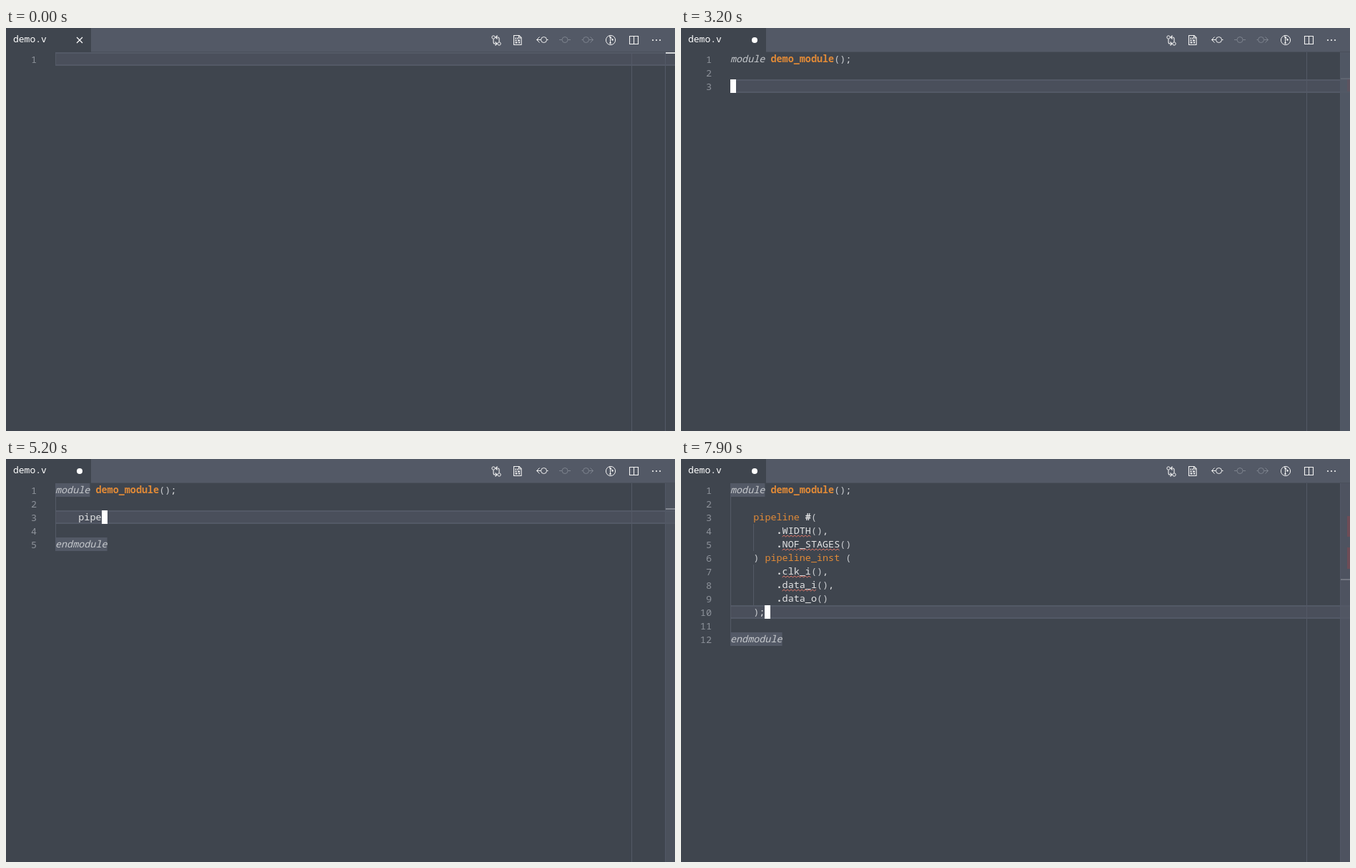
An HTML page with a canvas that plays this animation: 936 by 565 pixels, repeating every 8000 ms.

```html
<!DOCTYPE html>
<html lang="en">
<head>
<meta charset="utf-8">
<title>Verilog completion</title>
<style>
html, body { margin: 0; width: 100%; height: 100%; overflow: hidden; background: #3f454e; }
canvas { display: block; }
</style>
</head>
<body>
<canvas id="stage" width="936" height="565"></canvas>
<script>
const ctx = document.getElementById('stage').getContext('2d');
const LOOP = 8000, TOP = 34, LEFT = 69, ROW = 19, CELL = 8.065, CODE = 13.44;
const color = {
  bg: '#3f454e', bar: '#535966', line: '#4a4f5b', white: '#f2f2f2', text: '#e4e5e6',
  soft: '#c6c9cd', number: '#8d929a', orange: '#e18a37', blue: '#0b86e4',
  warning: '#c9a416', error: '#e2786a', dim: '#7d838e'
};
const HEADER = 'module demo_module';
const SNIPPET = [
  HEADER + '();', '', '    pipeline #(', '        .WIDTH(),', '        .NOF_STAGES()',
  '    ) pipeline_inst (', '        .clk_i(),', '        .data_i(),', '        .data_o()',
  '    );', '', 'endmodule'
];

const clamp = (v, lo = 0, hi = 1) => Math.min(hi, Math.max(lo, v));
const rowY = row => TOP + row * ROW;
const colX = col => LEFT + col * CELL;

function rect(x, y, w, h, fill) {
  ctx.fillStyle = fill;
  ctx.fillRect(x, y, w, h);
}

function text(str, x, y, fill = color.text, size = CODE, style = '') {
  ctx.font = `${style} ${size}px "Noto Sans Mono", "DejaVu Sans Mono", monospace`;
  ctx.fillStyle = fill;
  ctx.fillText(str, x, y);
}

function stroke(path, ink = color.white, width = 1) {
  ctx.strokeStyle = ink;
  ctx.lineWidth = width;
  ctx.stroke(new Path2D(path));
}

function circle(x, y, r, ink, filled) {
  ctx.beginPath();
  ctx.arc(x, y, r, 0, Math.PI * 2);
  ctx.lineWidth = 1;
  ctx.fillStyle = ctx.strokeStyle = ink;
  filled ? ctx.fill() : ctx.stroke();
}

// How much of a phrase is typed when keys land evenly on 100 ms steps.
function typed(str, start, end, t) {
  const steps = (end - start) / 100 + 1;
  const done = clamp(Math.floor((t - start) / 100) + 1, 0, steps);
  return str.slice(0, Math.round(done * str.length / steps));
}

// The document, cursor and diagnostics at time t.
function editorAt(t) {
  const head = HEADER + '();';
  const state = (lines, row, col, extra) => ({ lines, row, col, squiggles: [], marks: [], ...extra });
  if (t < 2500) {
    const name = typed(HEADER.slice(0, 10), 800, 1500, t) + typed(HEADER.slice(10), 1700, 2200, t);
    const line = name + (t >= 2400 ? '();' : t >= 2300 ? '()' : '');
    return state([line], 0, t >= 2300 && t < 2400 ? 19 : line.length);
  }
  if (t < 2600) return state([head, ''], 1, 0);
  if (t < 4200) {
    const word = typed('endmodule', 3300, 4000, t);
    return state([head, '', word], 2, word.length, { marks: [[2, 'red']] });
  }
  if (t < 4300) return state([head, '', '', 'endmodule'], 3, 0);
  if (t < 7100) {
    const line = t < 4600 ? '' : '    ' + typed('pipe', 4800, 5100, t);
    const broken = t >= 5300;
    return state([head, '', line, '', 'endmodule'], t < 4400 ? 4 : 2, line.length, {
      squiggles: broken ? [[2, 4, 4, color.warning], [4, 0, 9, color.error]] : [],
      marks: broken ? [[2, 'orange'], [4, 'red']] : []
    });
  }
  if (t < 7400) return state(SNIPPET, 9, 6, {
    squiggles: [[2, 4, 4, color.warning], [11, 0, 9, color.error]],
    marks: [[2, 'orange'], [11, 'red']]
  });
  return state(SNIPPET, 9, 6, {
    squiggles: [[3, 9, 5], [4, 9, 10], [6, 9, 5], [7, 9, 6]].map(s => [...s, color.error]),
    marks: [3, 4, 6, 7].map(row => [row, 'red'])
  });
}

function sliderAlpha(t) {
  const shows = [[2600, 3120], [4300, 4900], [7200, 7700]];
  const current = shows.filter(([on]) => t >= on).pop();
  return current ? clamp(1 - (t - current[1]) / 800) : 0;
}

function drawToolbar(dirty) {
  rect(0, 0, 936, 33, color.bar);
  rect(119, 33, 817, 1, '#4a505b');
  rect(0, 0, 119, 34, color.bg);
  text('demo.v', 10, 20, '#ffffff', 13);
  if (dirty) circle(103, 17, 4, '#ffffff', true);
  else stroke('M99 13l8 8m0-8l-8 8', '#ffffff', 1.2);

  circle(682, 13, 2.2, color.white);
  circle(690, 22, 2.2, color.white);
  stroke('M682 15.5V20q0 2 2 2h3m-2.5-2.5L687 22l-2.5 2.5M690 19.5V15q0-2-2-2h-3m2.5-2.5L685 13l2.5 2.5', color.white, 1.1);

  stroke('M710.5 10.5h7.5l3 3v10h-10.5zM717.5 10.5v3.5h3.5', color.white, 1.1);
  stroke('M712.5 14.5h1.5m1 0h1.5M712.5 17.5h2m1.5 0h3M712.5 20.5h3m1.5 0h2', color.white, 2);

  circle(752.5, 16.5, 4, color.white);
  stroke('M748.5 16.5H742.5m4-4l-4 4l4 4M756.5 16.5h2');
  circle(782, 16.5, 4, color.dim);
  stroke('M774 16.5h4m8 0h4', color.dim);
  circle(811.5, 16.5, 4, color.dim);
  stroke('M805.5 16.5h2m8 0h6m-4-4l4 4l-4 4', color.dim);

  circle(846, 17, 6.6, color.white);
  stroke('M845.5 12v10M844 11l5 5.5');
  circle(845.5, 21, 1.2, color.white, true);
  circle(845.5, 13, 1.2, color.white, true);
  circle(848.5, 16.5, 1.2, color.white, true);
  stroke('M872.5 11.5h12v11h-12zM878.5 11.5v11', color.white, 1.1);
  for (const x of [905, 910, 915]) circle(x, 17, 1.1, color.white, true);
}

function tokenStyle(word, row, col) {
  if (/^(end)?module$/.test(word) && col === 0) return [color.soft, 'italic'];
  if (row === 0 && col >= 7 && /\w/.test(word)) return [color.orange, 'bold'];
  if (word.startsWith('pipeline')) return [color.orange, ''];
  if (/[()]/.test(word)) return [color.soft, ''];
  return [color.text, /[.#]/.test(word) ? 'bold' : ''];
}

function drawSquiggle(row, col, count, ink) {
  const x0 = colX(col), y = rowY(row) + 17;
  ctx.beginPath();
  for (let x = 0, i = 0; x <= count * CELL; x += 2.5, i++) ctx.lineTo(x0 + x, y + (i % 2 ? -1 : 1));
  ctx.strokeStyle = ink;
  ctx.lineWidth = 1;
  ctx.stroke();
}

function drawGuides(lines) {
  if (!lines.some(line => line.startsWith('    '))) return;
  rect(LEFT, rowY(1), 1, (lines.length - 2) * ROW, '#545a66');
  lines.forEach((line, row) => {
    if (line.startsWith('        ')) rect(101, rowY(row), 1, ROW, '#545a66');
  });
}

function drawOverview(editor, t) {
  const pitch = 19.3 - 0.37 * editor.lines.length;
  const markY = row => TOP + row * pitch + (row ? 1 : 0);
  rect(922, TOP, 1, 531, color.bar);
  for (const [row, kind] of editor.marks) {
    rect(932, Math.round(markY(row)), 4, Math.round(pitch), kind === 'red' ? '#be2826' : '#cc882b');
  }
  rect(923, Math.round(markY(editor.row)) - (editor.row ? 1 : 0), 13, 2, '#d2d5d8');
  ctx.globalAlpha = sliderAlpha(t);
  rect(922, TOP, 14, 531, color.bar);
  ctx.globalAlpha = 1;
}

function drawEditor(editor, t) {
  const { lines, row, col } = editor;
  const y = rowY(row);
  rect(LEFT, y, 867, ROW, color.bar);
  rect(LEFT + 1, y + 2, 866, ROW - 4, color.line);
  if (t >= 4200) {
    rect(LEFT, TOP, 6 * CELL, ROW, color.bar);
    rect(LEFT, rowY(lines.length - 1), 9 * CELL, ROW, color.bar);
  }
  drawGuides(lines);
  rect(875, TOP, 1, 531, color.bar);

  lines.forEach((line, i) => {
    const base = rowY(i) + 14, label = String(i + 1);
    text(label, 43 - label.length * CELL, base + 1, color.number);
    for (const { 0: word, index } of line.matchAll(/\w+|[()]+|[^\w\s()]/g)) {
      const [ink, style] = tokenStyle(word, i, index);
      text(word, colX(index), base, ink, CODE, style);
    }
  });
  editor.squiggles.forEach(s => drawSquiggle(...s));
  if (t >= 800) rect(Math.round(colX(col)), y, 8, ROW, '#ffffff');
  drawOverview(editor, t);
}

function drawSuggestion() {
  rect(134, 91, 330, 19, color.bar);
  text('{}', 137, 106, color.soft, 12.5);
  text('pipe', 157, 106, color.blue, CODE, 'bold');
  text('line', 157 + 4 * CELL, 106, color.soft);
}

function badge(label, y, width) {
  ctx.beginPath();
  ctx.roundRect(477, y - 12, width, 15, 3);
  ctx.fillStyle = '#30323b';
  ctx.fill();
  text(label, 484, y - 1, color.text, 11.9);
}

function drawDocs() {
  const doc = (str, x, y, style) => text(str, x, y, color.text, 14, style);
  rect(464, 91, 330, 170, color.bar);
  rect(465, 92, 328, 168, '#41444e');
  text('module pipeline', 470, 110, '#b4b7bc');
  stroke('M778 97.5l7 7m0-7l-7 7', color.soft, 1.1);
  doc('A parametrized pipeline module.', 470, 145);
  doc("You're able to configure the ", 470, 164);
  doc('width', 713.6, 164, 'italic');
  doc('(', 470, 183);
  badge('WIDTH', 183, 48);
  doc(') and the', 525, 183);
  doc('number of stages', 609, 183, 'italic');
  doc('(', 470, 202);
  badge('NOF_STAGES', 202, 83);
  doc(')', 560, 202);
  rect(470, 221, 296, 2, color.white);
  doc('File: pipeline.v', 470, 251);
}

function draw(t) {
  rect(0, 0, 936, 565, color.bg);
  drawToolbar(t >= 800);
  drawEditor(editorAt(t), t);
  if (t >= 5500 && t < 7100) drawSuggestion();
  if (t >= 5600 && t < 7100) drawDocs();
}

function tick() {
  draw(Math.floor(performance.now() % LOOP / 100) * 100);
  requestAnimationFrame(tick);
}
tick();
</script>
</body>
</html>
```
